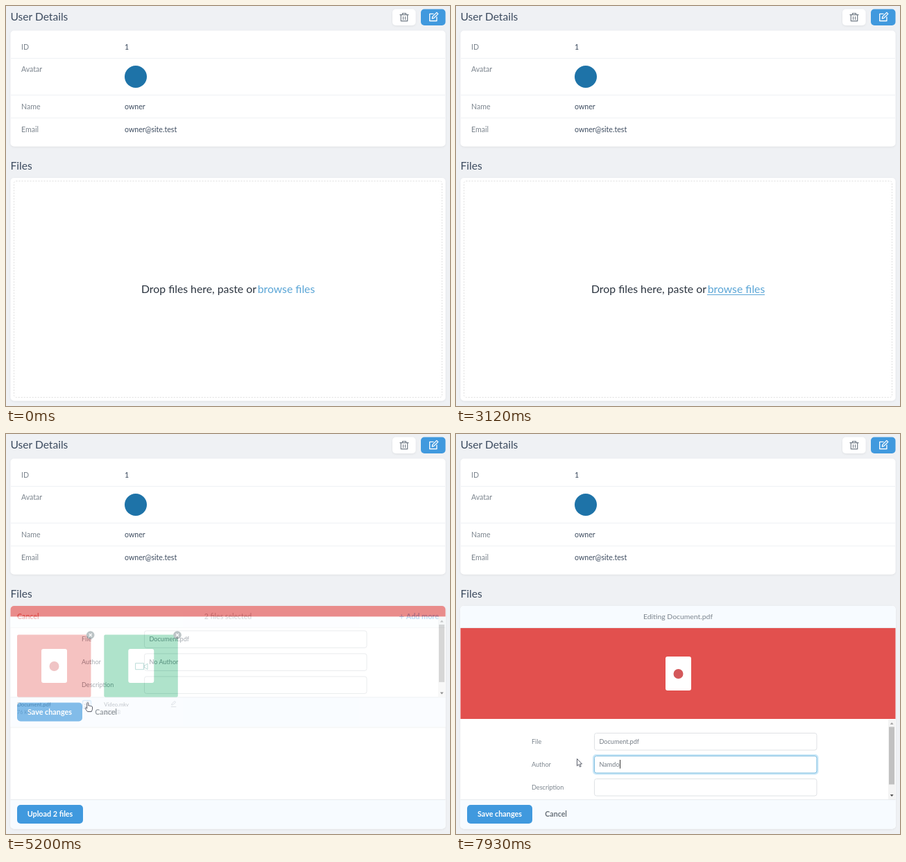
These frames come from a looping animation (640x577 px, 8 s). An HTML page:

```html
<!DOCTYPE html>
<html lang="en">
<head>
<meta charset="utf-8">
<title>User details</title>
<style>
  html, body { margin: 0; width: 100%; height: 100%; overflow: hidden; background: #eff1f4; }
  svg { display: block; width: 100%; height: 100%; font-family: Lato, "Open Sans", sans-serif; }
  text { white-space: pre; }
</style>
</head>
<body>
<svg id="stage" viewBox="0 0 640 577">
  <defs>
    <filter id="shadow" x="-5%" y="-10%" width="110%" height="125%">
      <feDropShadow dx="0" dy="1" stdDeviation="1.5" flood-color="#000" flood-opacity=".07"/>
    </filter>
    <clipPath id="box"><rect x="6.5" y="248" width="627" height="321.5" rx="5"/></clipPath>
  </defs>
</svg>
<script>
const LOOP = 8000, TICK = 130;
const INK = '#3c4b5f', MUTED = '#7c858e', BLUE = '#4099de', RED = '#e2504e', GREEN = '#1bb06b';
const PALE = '#f7fbff', LINE = '#e8ebee';
const stage = document.getElementById('stage');

function add(parent, tag, attrs = {}, content) {
  const node = document.createElementNS('http://www.w3.org/2000/svg', tag);
  for (const key in attrs) node.setAttribute(key, attrs[key]);
  if (content !== undefined) node.textContent = content;
  parent.append(node);
  return node;
}
const group = (parent, attrs) => add(parent, 'g', attrs);
const rect = (parent, x, y, width, height, fill, more) =>
  add(parent, 'rect', { x, y, width, height, fill, ...more });
const path = (parent, d, stroke, more) =>
  add(parent, 'path', { d, stroke, fill: 'none', ...more });
const label = (parent, x, y, size, fill, content, more) =>
  add(parent, 'text', { x, y, 'font-size': size, fill, ...more }, content);
const BOLD = { 'font-weight': 700 };
const MIDDLE = { 'text-anchor': 'middle' };
const ROUND = { 'stroke-linecap': 'round', 'stroke-linejoin': 'round' };
const show = (node, on) => node.setAttribute('display', on ? 'inline' : 'none');

function card(y, height) {
  rect(stage, 6.5, y, 627, height, '#fff', { rx: 5, filter: 'url(#shadow)' });
}

function blueButton(parent, width, content) {
  rect(parent, 16, 535, width, 27, BLUE, { rx: 5 });
  label(parent, 16 + width / 2, 552.3, 10.8, '#fff', content, { ...BOLD, ...MIDDLE });
}

function fileSheet(parent, x, y) {
  rect(parent, x, y, 37, 49, '#fff', { rx: 3 });
}

function pdfBadge(parent, x, y) {
  fileSheet(parent, x, y);
  add(parent, 'circle', { cx: x + 18.5, cy: y + 25, r: 7, fill: '#d4585a' });
}

// Page header and details card
rect(stage, 0, 0, 640, 577, '#eff1f4');
label(stage, 6.5, 21.3, 15.6, INK, 'User Details');
rect(stage, 557, 4.5, 33.5, 23.5, '#fff', { rx: 5, filter: 'url(#shadow)' });
path(stage, 'M568 12.7h12M571.5 12.5v-2h5v2M569.3 13v8.7h9.4V13M572.5 15.5v4M575.5 15.5v4', '#737d88',
  { 'stroke-width': 1.2, ...ROUND });
rect(stage, 598, 4.5, 35.5, 23.5, BLUE, { rx: 5 });
path(stage, 'M616 11.3h-5.3v10.2h10.2V16M614.3 18l.5-2.6 6-6 2 2-6 6z', '#fff',
  { 'stroke-width': 1.3, ...ROUND });

card(35.5, 167);
for (const y of [75.5, 128.5, 161.5]) path(stage, `M7 ${y}H633`, '#eff1f4');
const details = [['ID', '1', 62.7], ['Avatar', '', 95.4], ['Name', 'owner', 148.7], ['Email', 'owner@site.test', 181.6]];
for (const [name, value, y] of details) {
  label(stage, 22, y, 10.6, MUTED, name);
  label(stage, 171, y, 10.6, INK, value);
}
add(stage, 'circle', { cx: 187, cy: 102, r: 16, fill: '#1e73a8' });

label(stage, 6.5, 236.2, 15.6, INK, 'Files');
card(248, 321.5);
const files = group(stage, { 'clip-path': 'url(#box)' });

// Empty drop area
const dropArea = group(files);
rect(dropArea, 11.5, 252.5, 617, 312, 'none', { rx: 3, stroke: '#dfdfdf', 'stroke-dasharray': '2 2' });
label(dropArea, 195, 413.8, 15.8, '#2c3540', 'Drop files here, paste or');
label(dropArea, 445.3, 413.8, 15.8, '#5aa5d6', 'browse files', { 'text-anchor': 'end' });
const underline = path(dropArea, 'M362 416.5H445', '#5aa5d6');

// List of selected files
const list = group(files);
function bars(parent) {
  rect(parent, 6, 248, 628, 31.5, PALE);
  rect(parent, 6, 527, 628, 43, PALE);
  path(parent, 'M6 279.5H634M6 527.5H634', LINE);
}
bars(list);
label(list, 16, 267.2, 10.6, '#d43f3a', 'Cancel', BOLD);
label(list, 320, 267.2, 10.5, MUTED, '2 files selected', MIDDLE);
path(list, 'M567 263.5h6.5M570.2 260.3v6.5', BLUE);
label(list, 624, 267.2, 10.8, BLUE, 'Add more', { ...BOLD, 'text-anchor': 'end' });

function tile(x, color, name, size) {
  rect(list, x, 289.5, 106.5, 90, color, { rx: 2 });
  add(list, 'circle', { cx: x + 105.7, cy: 290, r: 5.8, fill: '#3f575c' });
  path(list, `M${x + 103.7} 288l4 4m0-4l-4 4`, '#fff', { 'stroke-width': 1.1 });
  label(list, x, 392.6, 7.7, '#5b626a', name);
  label(list, x, 403.6, 7.2, '#a0a5aa', size);
  path(list, `M${x + 97.3} 391l.6-2 4-3.6 1.5 1.6-4 3.5zM${x + 96.5} 393.5h7.5`, '#9aa0a6', { 'stroke-width': .8 });
}
tile(16, RED, 'Document.pdf', '76 KB');
tile(141.3, GREEN, 'Video.mkv', '203 KB');
pdfBadge(list, 51, 310);
fileSheet(list, 176.3, 310);
path(list, 'M187 330.7h11.5v9H187zM198.5 335.2l5.5-4v8z', '#3d9c90', ROUND);
const uploadRing = rect(list, 14.5, 533.5, 98, 30, 'none', { rx: 6, stroke: '#b4d8f3', 'stroke-width': 3 });
const pencilRing = rect(list, 110.5, 384.5, 12, 11.5, 'none', { rx: 2, stroke: '#a9d2f0', 'stroke-width': 1.5 });
blueButton(list, 95, 'Upload 2 files');

// Sliding editor panel
const editor = group(files);
rect(editor, 6, 569, 628, 3, '#000', { opacity: .05 });
rect(editor, 6, 248, 628, 321.5, '#fff');
bars(editor);
label(editor, 320, 267.2, 10.4, MUTED, 'Editing Document.pdf', MIDDLE);
rect(editor, 6, 280, 628, 131, RED);
pdfBadge(editor, 302, 321);

function field(y, name, value) {
  const height = 25;
  label(editor, 109, y + 15.7, 9.1, MUTED, name);
  const ring = rect(editor, 198.5, y - .5, 322.5, height + 1.5, 'none',
    { rx: 3.5, stroke: '#b9dff5', 'stroke-width': 3, opacity: .75 });
  const frame = rect(editor, 199.5, y + .5, 320.5, height - .5, '#fff', { rx: 3 });
  const marked = rect(editor, 206.5, y + 6, 0, 13, '#2f80d8');
  const text = label(editor, 206.5, y + 15.7, 9.1, '#757d86', value);
  return { ring, frame, marked, text };
}
const fileField = field(431, 'File', 'Document.pdf');
const authorField = field(464, 'Author', 'No Author');
const aboutField = field(497, 'Description', '');
const caret = rect(editor, 0, 470, 1, 12.5, '#333');

function focus(target, on) {
  show(target.ring, on);
  target.frame.setAttribute('stroke', on ? '#7dbce0' : '#dfe2e5');
}

rect(editor, 623, 412, 10.5, 115, '#f4f4f4');
rect(editor, 624, 422.5, 8, 83, '#c1c1c1');
add(editor, 'path', { d: 'M625.8 419h4.8l-2.4-3z', fill: '#a3a3a3' });
add(editor, 'path', { d: 'M625.8 520h4.8l-2.4 3z', fill: '#505050' });
blueButton(editor, 94, 'Save changes');
label(editor, 128.3, 552.3, 10.6, '#6a727a', 'Cancel', BOLD);

// Pointers, drawn with the hot spot at 0,0
const arrow = path(stage, 'M.5 .5v10.3l2.4-2.2 1.6 3.6 1.7-.8-1.6-3.4h3z', '#4a4f5c', { fill: '#fff', 'stroke-width': .9 });
const hand = path(stage,
  'M-1.3 8.5V1.2Q-.2-.3.9 1.2V5q1.2-.8 2 .3 1.2-.6 1.9.5 1.4-.4 1.7.8v3.6L5.2 13.5H-.6L-4 8.6q.2-1.7 2.7-.1z',
  '#4a4f5c', { fill: '#fff', 'stroke-width': .9, ...ROUND });

// Each route: waypoints of [time, x, y]; the pointer is hidden between routes
const routes = [
  [[130, 478, 523], [390, 446, 472], [780, 404, 413], [1040, 404, 413], [2080, 404.5, 414], [2990, 404.5, 414]],
  [[3510, 384, 297], [3770, 374, 302], [4030, 341, 322], [4290, 220, 364], [4550, 118, 387], [5460, 118, 387],
    [5720, 188, 455], [5850, 188, 455]],
  [[6240, 192, 470], [6370, 174, 468], [LOOP, 174, 468]]
];

const clamp = v => Math.max(0, Math.min(1, v));
const easeInOut = p => p < .5 ? 2 * p * p : 1 - 2 * (1 - p) ** 2;

function pointerAt(t) {
  const route = routes.find(r => t >= r[0][0] && t < r[r.length - 1][0]);
  if (!route) return null;
  const i = route.findIndex(point => point[0] > t);
  const [t0, x0, y0] = route[i - 1], [t1, x1, y1] = route[i];
  const p = (t - t0) / (t1 - t0);
  return [x0 + (x1 - x0) * p, y0 + (y1 - y0) * p];
}

const typedName = 'Namdo';
const keyTimes = [7020, 7280, 7540, 7670, 7930];

function drawAuthor(t) {
  const typed = keyTimes.filter(k => t >= k).length;
  const selected = t >= 6240 && !typed;
  const { text, marked } = authorField;
  text.textContent = typed ? typedName.slice(0, typed) : 'No Author';
  text.setAttribute('fill', selected ? '#fff' : '#757d86');
  const width = text.getComputedTextLength();
  marked.setAttribute('width', selected ? width : 0);
  caret.setAttribute('x', 207 + width);
  show(caret, typed);
}

function render(time) {
  const t = Math.floor(time / TICK) * TICK;
  const hasFiles = t >= 3510;
  show(dropArea, !hasFiles);
  show(list, hasFiles);
  show(underline, t >= 780);
  show(uploadRing, t < 4810);
  show(pencilRing, t >= 4810);

  const slide = easeInOut(clamp((t - 5067) / 250));
  show(editor, slide > 0);
  editor.setAttribute('transform', `translate(0 ${-337 * (1 - slide)})`);
  editor.setAttribute('opacity', slide ** .75);
  focus(fileField, t >= 5330 && t < 6110);
  focus(authorField, t >= 6110);
  focus(aboutField, false);
  drawAuthor(t);

  const pointer = pointerAt(t);
  const onLink = (t >= 780 && t < 2990) || (t >= 4550 && t < 5330);
  show(hand, pointer && onLink);
  show(arrow, pointer && !onLink);
  if (pointer) (onLink ? hand : arrow).setAttribute('transform', `translate(${pointer})`);
}

const start = performance.now();
function tick() {
  render((performance.now() - start) % LOOP);
  requestAnimationFrame(tick);
}
tick();
</script>
</body>
</html>
```
